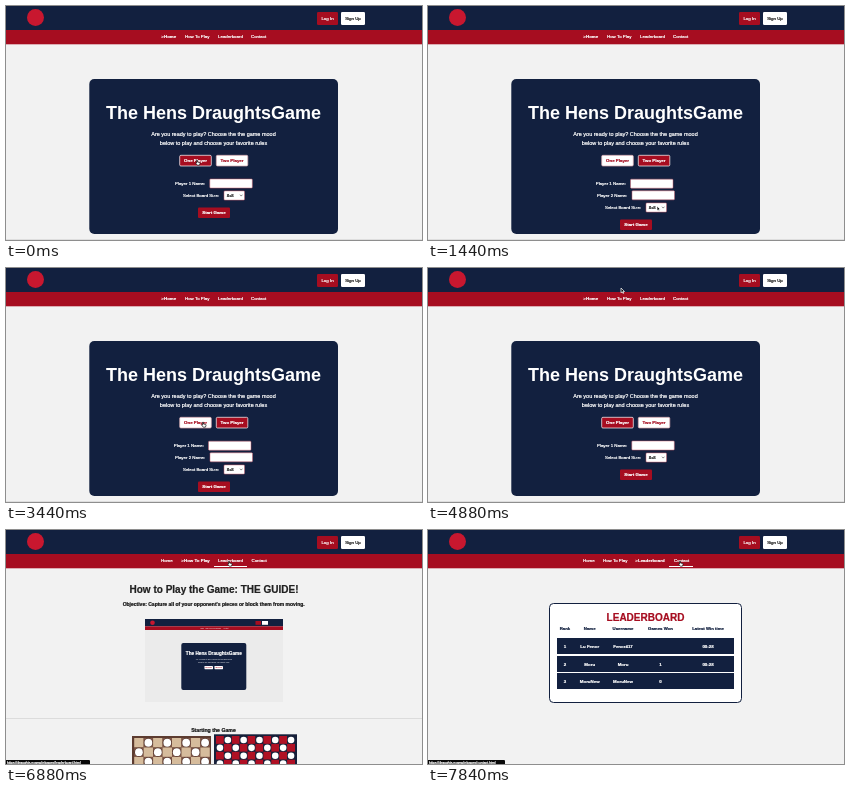
Write an HTML page with a canvas that moves like this. It is 416 px wide and 234 px high and loops after 8000 ms.

```html
<!DOCTYPE html>
<html lang="en">
<head>
<meta charset="utf-8">
<title>Board game site tour</title>
<style>
html, body { margin: 0; width: 100%; height: 100%; overflow: hidden; background: #f2f2f2; }
canvas { display: block; width: 416px; height: 234px; }
</style>
</head>
<body>
<canvas id="stage"></canvas>
<script>
const W = 416, H = 234, LOOP = 8000;
const NAVY = '#12203f', RED = '#a60d20', PAGE = '#f2f2f2', INK = '#151515';
const FONT = '"Liberation Sans", Arial, sans-serif';
const GAME = 'The Hens DraughtsGame';
const canvas = document.getElementById('stage');
const g = canvas.getContext('2d');
const scale = window.devicePixelRatio || 1;
canvas.width = W * scale;
canvas.height = H * scale;

function rect(x, y, x2, y2, fill) {
  g.fillStyle = fill;
  g.fillRect(x, y, x2 - x, y2 - y);
}

function box(x, y, x2, y2, r, fill, stroke, width = 0.7) {
  g.beginPath();
  g.roundRect(x, y, x2 - x, y2 - y, r);
  g.fillStyle = fill;
  g.fill();
  if (stroke) {
    g.strokeStyle = stroke;
    g.lineWidth = width;
    g.stroke();
  }
}

function disc(x, y, r, fill) {
  g.beginPath();
  g.arc(x, y, r, 0, Math.PI * 2);
  g.fillStyle = fill;
  g.fill();
}

function text(str, x, y, size, fill, { bold = false, align = 'center' } = {}) {
  g.font = `${bold ? 'bold ' : ''}${size}px ${FONT}`;
  g.textAlign = align;
  g.fillStyle = fill;
  g.fillText(str, x, y);
  // A hairline keeps small type crisp
  if (size > 2 && size < 11) {
    g.strokeStyle = fill;
    g.lineWidth = 0.22;
    g.lineJoin = 'round';
    g.strokeText(str, x, y);
  }
}

const LABELS = ['Home', 'How To Play', 'Leaderboard', 'Contact'];
const NAV = {
  home: { active: 0, xs: [158, 179, 212, 245] },
  guide: { active: 1, xs: [155, 178, 212, 245.5] },
  leaders: { active: 2, xs: [155, 175, 210, 246] }
};
const UNDERLINES = [[152, 173], [175, 207], [208, 241], [241, 265]];

function header(page, hover) {
  rect(0, 0, W, 24, NAVY);
  rect(0, 24, W, 38.3, RED);
  disc(29.5, 11.5, 8.5, '#c8172f');
  box(311, 6, 332, 19, 1.2, RED);
  text('Log In', 321.5, 14, 4.4, '#fff');
  box(335, 6, 359, 19, 1.2, '#fff');
  text('Sign Up', 347, 14, 4.4, INK);
  const { active, xs } = NAV[page];
  LABELS.forEach((label, i) => {
    const bold = i === active;
    if (bold) text('>', xs[i] - 2.8, 32, 4.4, '#fff', { bold, align: 'left' });
    text(label, xs[i], 32, 4.4, '#fff', { bold, align: 'left' });
  });
  if (hover >= 0 && hover !== active) {
    const [a, b] = UNDERLINES[hover];
    rect(a, 36, b, 37, '#fff');
  }
}

function modeButton(label, x, x2, on) {
  box(x, 149.3, x2, 160, 1.2, on ? RED : '#fff', on ? '#fff' : '#d9a7ae');
  text(label, (x + x2) / 2, 156.2, 4.4, on ? '#fff' : RED, { bold: true });
}

function nameField(n, labelX, x, y) {
  text(`Player ${n} Name:`, labelX, y + 1.3, 4.4, '#fff', { align: 'left' });
  box(x, y - 4.5, x + 42.5, y + 4.5, 0.8, '#fff', '#c8616e', 0.5);
}

function home(two) {
  rect(0, 233, W, 234, '#dedede');
  box(83.3, 73, 332, 228, 5, NAVY);
  text(GAME, 207.5, 112.8, 18, '#fff', { bold: true });
  text('Are you ready to play? Choose the the game mood', 207.5, 130.3, 5.5, '#fff');
  text('below to play and choose your favorite rules', 207.5, 139.3, 5.5, '#fff');
  modeButton('One Player', 173.7, 205.3, !two);
  modeButton('Two Player', 210.3, 241.8, two);
  if (two) {
    nameField(1, 167.7, 202.5, 177.7);
    nameField(2, 169, 204, 189.3);
  } else {
    nameField(1, 169, 203.8, 177.5);
  }
  const y = two ? 201.5 : 189.5;
  text('Select Board Size:', 177, y + 1.3, 4.4, '#fff', { align: 'left' });
  box(218, y - 4.6, 238.5, y + 4.6, 0.8, '#fff', '#c8616e', 0.5);
  text('8x8', 220.8, y + 1.5, 4.2, INK, { align: 'left' });
  g.beginPath();
  g.moveTo(234, y - 0.8);
  g.lineTo(235.2, y + 0.6);
  g.lineTo(236.4, y - 0.8);
  g.strokeStyle = INK;
  g.lineWidth = 0.5;
  g.stroke();
  const sy = y + 17.3;
  box(192, sy - 5.2, 224, sy + 5.2, 1, RED);
  text('Start Game', 208, sy + 1.5, 4.4, '#fff', { bold: true });
}

function thumbnail() {
  rect(139, 89, 277, 172, '#ebebeb');
  rect(139, 89, 277, 96.3, NAVY);
  rect(139, 96.3, 277, 100, RED);
  disc(146.5, 92.7, 2.3, '#c8172f');
  rect(249.5, 91, 255, 94.8, RED);
  rect(256, 91, 262, 94.8, '#fff');
  LABELS.forEach((s, i) => text(s, [196, 203, 211, 220][i], 98.7, 1.4, '#fff'));
  box(175.3, 113, 240.3, 160, 2, NAVY);
  text(GAME, 207.8, 124.8, 4.7, '#fff', { bold: true });
  text('Are you ready to play? Choose the the game mood', 207.8, 130.2, 1.6, '#fff');
  text('below to play and choose your favorite rules', 207.8, 132.8, 1.6, '#fff');
  box(198.5, 136, 207, 139.2, 0.4, '#fff');
  box(208.5, 136, 217, 139.2, 0.4, '#fff');
  text('One Player', 202.7, 138.1, 1.3, RED, { bold: true });
  text('Two Player', 212.8, 138.1, 1.3, RED, { bold: true });
}

function board(x, y, count, cell, dark, light, r, rim) {
  for (let row = 0; y + row * cell < H; row++) {
    for (let col = 0; col < count; col++) {
      const odd = (row + col) % 2;
      const cx = x + col * cell, cy = y + row * cell;
      rect(cx, cy, cx + cell, cy + cell, odd ? dark : light);
      if (odd) {
        disc(cx + cell / 2, cy + cell / 2, r, rim);
        disc(cx + cell / 2, cy + cell / 2, r - 0.6, '#fff');
      }
    }
  }
}

function guide() {
  text('How to Play the Game: THE GUIDE!', 208, 62.7, 10, '#212121', { bold: true });
  text("Objective: Capture all of your opponent's pieces or block them from moving.",
    207.7, 75.8, 5, INK, { bold: true });
  thumbnail();
  rect(0, 188, W, 189, '#dcdcdc');
  text('Starting the Game', 207.5, 201.6, 5.2, INK, { bold: true });
  rect(126, 206, 205, H, '#5d3c30');
  board(128.2, 208, 8, 9.45, '#7f5546', '#d6bc9c', 4.5, '#4a2f27');
  rect(208, 204.3, 291, H, '#17203a');
  board(210, 206, 10, 7.9, '#17203a', '#b01024', 3.9, '#17203a');
}

const COLUMNS = [137, 161.7, 195, 232.5, 280];
const HEADS = ['Rank', 'Name', 'Username', 'Games Won', 'Latest Win time'];
const ROWS = [
  ['1', 'Lu Fenor', 'Fenor417', '', '00:28'],
  ['2', 'Moru', 'Moru', '1', '00:28'],
  ['3', 'MoruNew', 'MoruNew', '0', '']
];

function leaders() {
  box(121.5, 73.5, 313.5, 172.5, 4, '#fff', NAVY, 1);
  text('LEADERBOARD', 217.5, 90.8, 10, RED, { bold: true });
  HEADS.forEach((s, i) => text(s, COLUMNS[i], 99.8, 4.3, NAVY, { bold: true }));
  ROWS.forEach((cells, n) => {
    const y = Math.round(108 + n * 17.5);
    rect(129, y, 306, y + 16, NAVY);
    cells.forEach((s, i) => text(s, COLUMNS[i], y + 9.5, 4.4, '#fff', { bold: true }));
  });
}

const LINKS = {
  1: [72, 'https://draughts.example/pages/how-to-play'],
  2: [84, 'https://draughts.example/pages/leaderboard.html'],
  3: [77, 'https://draughts.example/pages/contact.html']
};

function statusBar(hover) {
  const link = LINKS[hover];
  if (!link) return;
  box(-2, 230, link[0], 237, 1, '#080808');
  text(link[1], 1, 233.6, 3.4, '#fff', { align: 'left' });
}

// Pointer stops: time, x, y
const PATH = [
  [0, 190, 154], [80, 190, 154], [320, 224, 177], [560, 229, 189], [720, 226, 186],
  [960, 226, 155], [1120, 226, 155], [1440, 229, 200], [1760, 229, 200],
  [2160, 209, 218], [2480, 209, 218], [2880, 221, 188], [3280, 196, 154],
  [3600, 196, 154], [4160, 209, 207], [4400, 209, 207], [4880, 193, 20],
  [5040, 193, 29], [5840, 193, 29], [6160, 208, 120], [6480, 212, 124],
  [6640, 212, 124], [6800, 222, 31], [7360, 222, 31], [7600, 251, 31], [8000, 251, 31]
];

function pointerAt(t) {
  const i = Math.max(1, PATH.findIndex(p => p[0] > t));
  const [t0, x0, y0] = PATH[i - 1], [t1, x1, y1] = PATH[i];
  const u = (t - t0) / (t1 - t0), e = u * u * (3 - 2 * u);
  return [x0 + (x1 - x0) * e, y0 + (y1 - y0) * e];
}

const ARROW = new Path2D('M0 0V4.8L1.2 3.8 2 5.5 2.8 5.1 2 3.5H3.5Z');
const HAND = new Path2D('M.6 .3Q1.1-.3 1.5.4V2L3.7 2.5Q4.2 2.7 4 3.5L3.4 5.2H1.3L-.3 3.2Q-.2 2.5.6 3Z');

function pointer(x, y, hand) {
  const shape = hand ? HAND : ARROW;
  g.save();
  g.translate(x, y);
  g.lineWidth = 0.7;
  g.strokeStyle = hand ? '#111' : '#fff';
  g.fillStyle = hand ? '#fff' : '#111';
  g.fill(shape);
  g.stroke(shape);
  g.restore();
}

function hovered(x, y) {
  if (y < 25 || y > 37) return -1;
  return UNDERLINES.findIndex(([a, b]) => x >= a && x < b);
}

function draw(t) {
  g.setTransform(scale, 0, 0, scale, 0, 0);
  rect(0, 0, W, H, PAGE);
  const page = t < 5360 ? 'home' : t < 7120 ? 'guide' : 'leaders';
  const [x, y] = pointerAt(t);
  const hover = hovered(x, y);
  header(page, hover);
  if (page === 'home') home(t >= 1040 && t < 3520);
  else if (page === 'guide') guide();
  else leaders();
  statusBar(hover);
  const onButton = page === 'home' && x > 174 && x < 242 &&
    ((y > 149 && y < 160) || (y > 201 && x < 224));
  pointer(x, y, hover >= 0 || onButton);
}

const start = performance.now();
function tick() {
  draw((performance.now() - start) % LOOP);
  requestAnimationFrame(tick);
}
tick();
</script>
</body>
</html>
```
